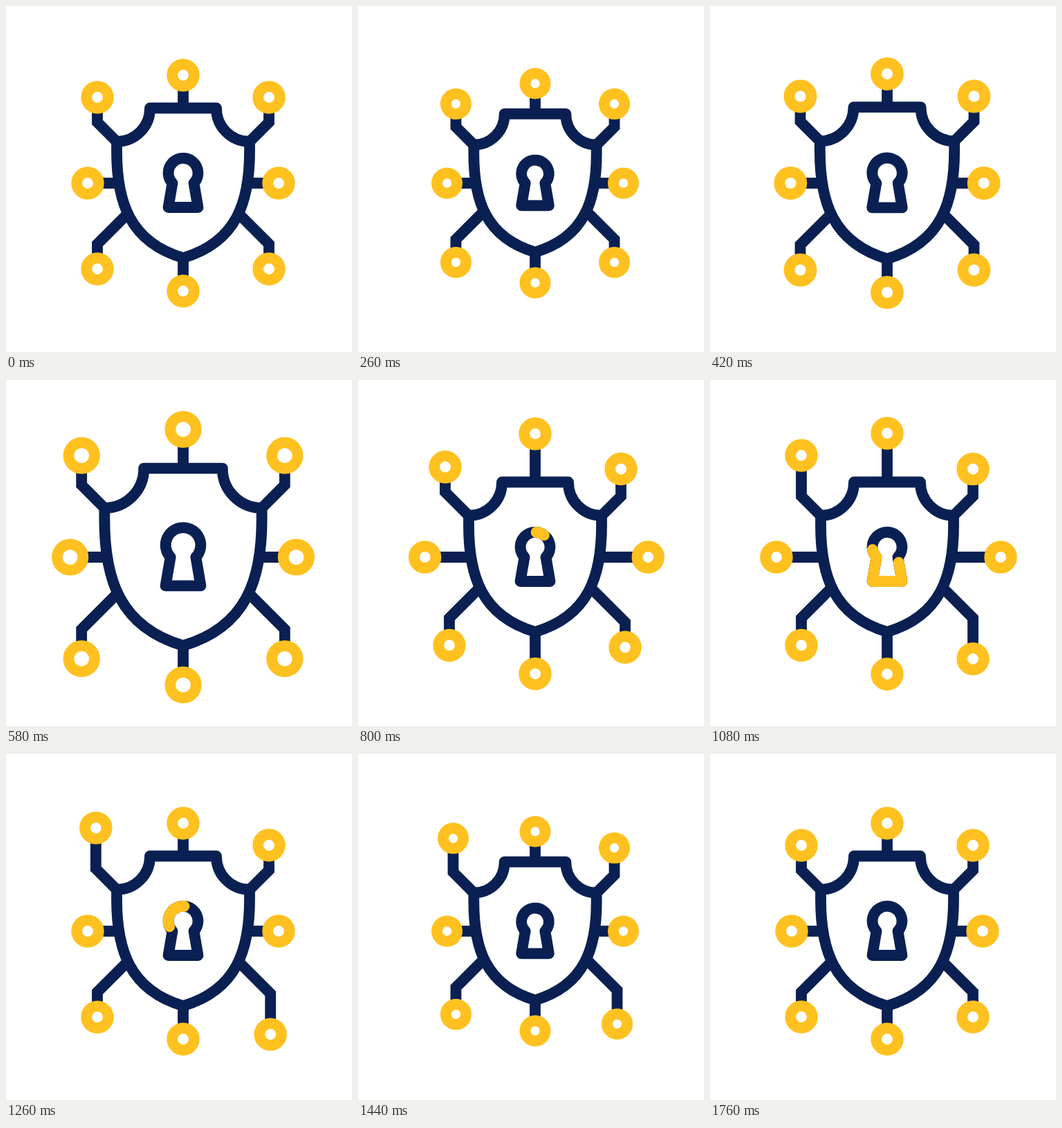
Animation of 500x500 px, one loop 2000 ms. Source, as an HTML page:

```html
<!DOCTYPE html>
<html lang="en">
<head>
<meta charset="utf-8">
<title>Shield network</title>
<style>
  html, body { margin: 0; width: 100%; height: 100%; overflow: hidden; background: #fff; }
  svg { display: block; width: 100vw; height: 100vh; }
</style>
</head>
<body>
<svg viewBox="-256 -256 500 500">
  <g id="icon" fill="none" stroke="#0a2052" stroke-linejoin="round">
    <g id="arms" stroke-linejoin="miter"></g>
    <path d="M-48-108.5H48A48 48 0 0 0 96-60V-46C96 26 78 85 0 108C-78 85-96 26-96-46V-60A48 48 0 0 0-48-108.5Z"/>
    <path id="keyhole" d="M1.5-36A21.3 21.3 0 0 1 15.5 0L21.5 35H-21.5L-15.5 0A21.3 21.3 0 0 1 1.5-36Z"/>
    <path id="glow" stroke="#ffc120" stroke-linecap="round" pathLength="1"/>
    <g id="rings" stroke="#ffc120"></g>
  </g>
</svg>
<script>
const LOOP = 2000, STROKE = 15.8, RING = 15.8;
const $ = id => document.getElementById(id);

// Eased 0 to 1 between two times.
function ramp(t, from, to) {
  const x = Math.min(1, Math.max(0, (t - from) / (to - from)));
  return x * x * (3 - 2 * x);
}

// Eased rise to 1 and fall back to 0.
const pulse = (t, from, peak, to) => ramp(t, from, peak) - ramp(t, peak, to);

const bodyScale = t => 1
  - .085 * (pulse(t, 100, 300, 600) + pulse(t, 1280, 1480, 1740))
  + .187 * pulse(t, 300, 600, 780);

// Arm along an axis, pushed outwards and pulled back.
function straightArm(x, y, reach) {
  const rest = x ? 138 : 156;
  return t => {
    const d = rest + reach * (ramp(t, 640, 820) - ramp(t, 1080, 1250));
    return [rest - 46, d].map(r => [x * r, y * r]);
  };
}

// Corner arm: a diagonal, then a vertical. One opposite pair slides and
// stretches far, the other pair only nudges twice.
function bentArm(sx, sy) {
  const far = sx === sy;
  const start = sy < 0 ? 96 : 80;
  return t => {
    const slide = far ? 6 * pulse(t, 640, 800, 1080) + 4.3 * pulse(t, 1080, 1440, 1720) : 0;
    const stretch = far
      ? 23 * (ramp(t, 780, 1080) - ramp(t, 1300, 1720))
      : 6.2 * (pulse(t, 640, 940, 1240) + pulse(t, 1240, 1440, 1720));
    const x = 124 + slide;
    return [[start, start - 36], [x, x - 36], [x, x + stretch]].map(p => [sx * p[0], sy * p[1]]);
  };
}

function add(parent, tag) {
  return parent.appendChild(document.createElementNS("http://www.w3.org/2000/svg", tag));
}

const nodes = [
  straightArm(0, -1, 23), straightArm(1, 0, 26), straightArm(0, 1, 13), straightArm(-1, 0, 22),
  bentArm(-1, -1), bentArm(1, -1), bentArm(1, 1), bentArm(-1, 1)
].map(pose => {
  const ring = add($("rings"), "circle");
  ring.setAttribute("r", RING);
  return { pose, arm: add($("arms"), "polyline"), ring };
});

$("glow").setAttribute("d", $("keyhole").getAttribute("d"));

function draw(t) {
  // The line weight stays constant while the shapes scale.
  const scale = bodyScale(t);
  $("icon").setAttribute("transform", `scale(${scale})`);
  $("icon").setAttribute("stroke-width", STROKE / scale);

  for (const { pose, arm, ring } of nodes) {
    const points = pose(t);
    const [x, y] = points.pop();
    const [px, py] = points[points.length - 1];
    const trim = RING / Math.hypot(x - px, y - py);
    points.push([x + (px - x) * trim, y + (py - y) * trim]);
    arm.setAttribute("points", points.join(" "));
    ring.setAttribute("cx", x);
    ring.setAttribute("cy", y);
  }

  const start = ramp(t, 920, 1400);
  const length = ramp(t, 731, 1212) - start;
  $("glow").setAttribute("visibility", length > .002 ? "visible" : "hidden");
  $("glow").setAttribute("stroke-dasharray", `${length} 2`);
  $("glow").setAttribute("stroke-dashoffset", -start);
}

const begin = performance.now();
function tick() {
  draw((performance.now() - begin) % LOOP);
  requestAnimationFrame(tick);
}
tick();
</script>
</body>
</html>
```
